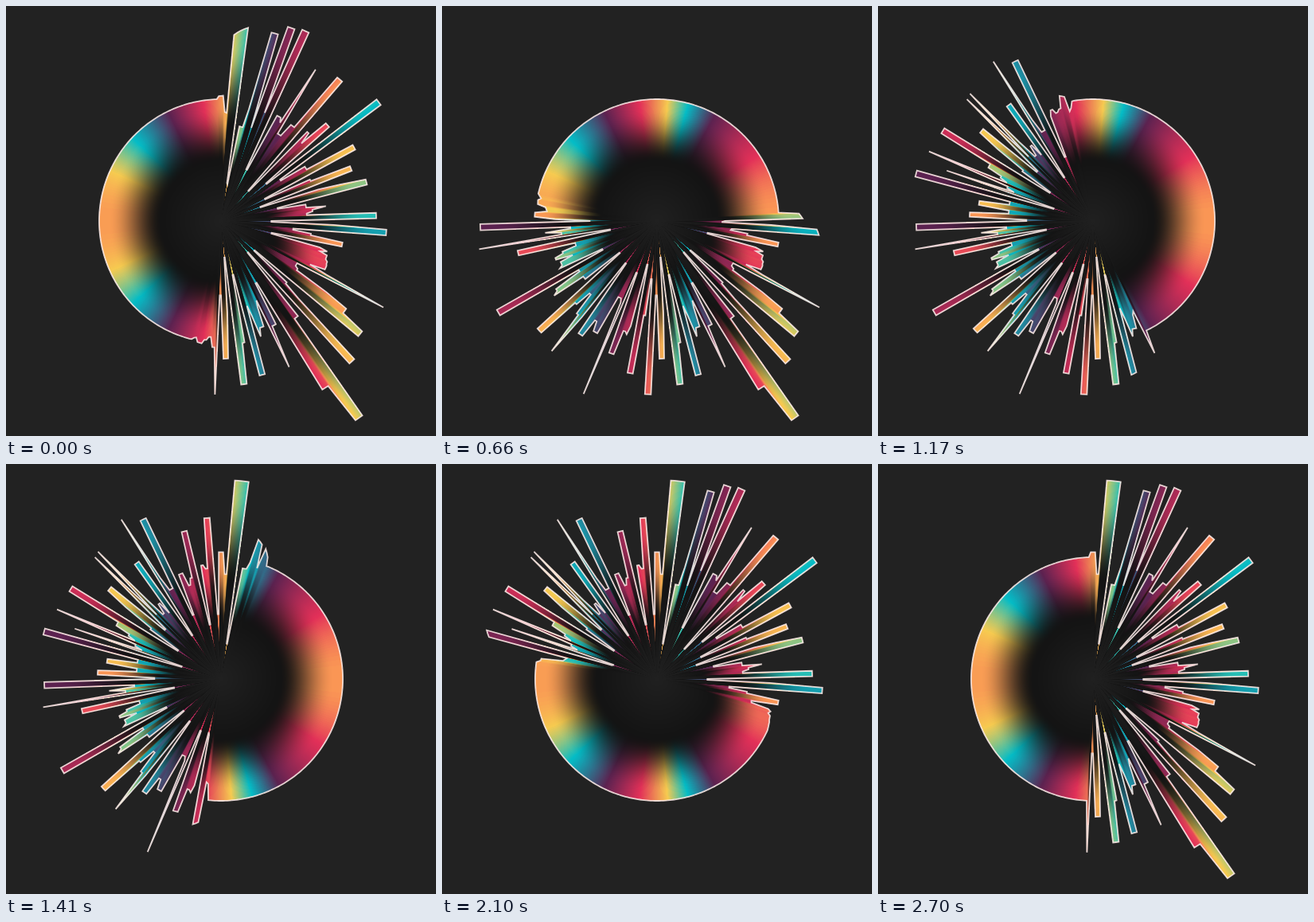
An HTML page with a canvas that plays this animation: 540x540 px, repeating every 2730 ms.

```html
<!DOCTYPE html>
<html lang="en">
<head>
<meta charset="utf-8">
<title>Radial burst</title>
<style>
html, body { margin: 0; width: 100%; height: 100%; overflow: hidden; background: #222; }
canvas { display: block; width: 540px; height: 540px; }
</style>
</head>
<body>
<canvas id="stage" width="540" height="540"></canvas>
<script>
const SIZE = 540, C = 270, RING = 153, BAR = 3;
const STEP = 30, STEPS = 91;
const ctx = document.getElementById('stage').getContext('2d');
const mod = (n, m) => ((n % m) + m) % m;
const clamp = v => Math.max(0, Math.min(1, v));

let seed = 7;
const random = () => (seed = seed * 16807 % 2147483647) / 2147483647;

// tall bars: [start degree, radius]
const peaks = [
  [-86, 250], [-84, 250], [-75, 245], [-71, 258], [-67, 261], [-51, 232], [-43, 180],
  [-38, 248], [-30, 191], [-23, 176], [-16, 189], [-3, 195], [3, 208], [10, 155],
  [35, 192], [38, 225], [46, 241], [54, 302], [57, 247], [74, 200], [81, 207],
  [87, 173], [92, 218], [99, 194], [108, 176], [123, 172], [136, 202], [149, 230],
  [166, 179], [177, 222], [194, 230], [210, 220], [218, 180], [233, 180], [243, 223],
  [255, 191], [264, 203]
];

// between bars: a deep notch beside each one, low random blocks, a few needles
const burst = new Float32Array(360);
const paint = (from, to, r) => {
  for (let d = from; d < to; d++) burst[mod(d, 360)] = r;
};
peaks.forEach(([start, r], i) => {
  const end = i + 1 < peaks.length ? peaks[i + 1][0] : peaks[0][0] + 360;
  let d = start + BAR;
  paint(start, d, r);
  if (end - d > 1) paint(d, d += 2, 45 + 50 * random());
  while (d < end) {
    const w = 1 + Math.floor(3 * random());
    const needle = end - d > 4 && random() < 0.35;
    if (needle) paint(d, ++d, 190 + 50 * random());
    paint(d, Math.min(end, d + w), 105 + 55 * random());
    d += w;
  }
});

// each ray takes its colour from the x of its outer end
const purple = [92, 34, 80], red = [226, 48, 88], orange = [250, 150, 85],
      yellow = [246, 202, 80], cyan = [4, 188, 198];
const stops = [
  [48, purple], [88, red], [115, orange], [130, yellow], [158, cyan],
  [203, purple], [247, red], [283, yellow], [309, cyan],
  [343, purple], [398, red], [422, orange], [440, yellow], [468, cyan], [515, purple]
];
function colorAt(x) {
  let i = 0;
  while (i < stops.length - 2 && x > stops[i + 1][0]) i++;
  const [a, p] = stops[i], [b, q] = stops[i + 1];
  const k = clamp((x - a) / (b - a));
  return p.map((v, n) => v + (q[n] - v) * k);
}
const colors = Array.from({ length: SIZE }, (_, x) => colorAt(x));

const image = ctx.createImageData(SIZE, SIZE);
const pixels = image.data;
const angles = new Float32Array(SIZE * SIZE);
const dists = new Float32Array(SIZE * SIZE);
for (let y = 0, p = 0; y < SIZE; y++) {
  for (let x = 0; x < SIZE; x++, p++) {
    const dx = x + 0.5 - C, dy = y + 0.5 - C;
    angles[p] = mod(Math.atan2(dy, dx) * 180 / Math.PI, 360);
    dists[p] = Math.hypot(dx, dy);
  }
}

// two edges, about half a turn apart, sweep clockwise: one opens, one closes
function amount(deg, n) {
  const edge = 4 * n - 1;
  const k = mod(deg - 93, 360);
  const open = k - edge, close = mod(deg - 269, 360) - edge;
  const grown = open <= 0 ? 1
    : open < 13 ? 0.36 * (1 - (open / 13) ** 2) * Math.min(1, 0.25 + n / 8) : 0;
  const shrunk = close <= 0 ? 1 : close < 15 ? 0.45 * (1 - close / 15) ** 2 : 0;
  return k < 176 ? grown * (1 - shrunk) : Math.max(1 - shrunk, grown);
}

const radii = new Float32Array(361);
function draw(n) {
  for (let d = 0; d < 360; d++) radii[d] = RING + (burst[d] - RING) * amount(d, n);
  radii[360] = radii[0];

  for (let p = 0, o = 0; p < angles.length; p++, o += 4) {
    let r = 34, g = 34, b = 34;
    if (dists[p] < 310) {
      const i = Math.min(359, Math.floor(angles[p]));
      const edge = radii[i] + (radii[i + 1] - radii[i]) * (angles[p] - i);
      const s = dists[p] / edge;
      if (s < 1) {
        const u = clamp((s - 0.48) / 0.45), lit = u * u * (3 - 2 * u);
        const dark = (32 - 14 * clamp(s / 0.55)) * (1 - lit);
        const x = C + (p % SIZE + 0.5 - C) / s;
        const c = colors[Math.max(0, Math.min(SIZE - 1, Math.floor(x)))];
        r = dark + c[0] * lit;
        g = dark + c[1] * lit;
        b = dark + c[2] * lit;
      }
    }
    pixels[o] = r;
    pixels[o + 1] = g;
    pixels[o + 2] = b;
    pixels[o + 3] = 255;
  }
  ctx.putImageData(image, 0, 0);

  ctx.beginPath();
  for (let d = 0; d < 360; d++) {
    const a = d * Math.PI / 180;
    ctx.lineTo(C + radii[d] * Math.cos(a), C + radii[d] * Math.sin(a));
  }
  ctx.closePath();
  ctx.lineWidth = 1.8;
  ctx.lineJoin = 'miter';
  ctx.miterLimit = 4;
  ctx.strokeStyle = 'rgba(255, 238, 234, 0.86)';
  ctx.stroke();
}

const start = performance.now();
let shown = -1;
function tick(now) {
  const n = Math.floor(Math.max(0, now - start) / STEP) % STEPS;
  if (n !== shown) draw(shown = n);
  requestAnimationFrame(tick);
}
draw(shown = 0);
requestAnimationFrame(tick);
</script>
</body>
</html>
```
